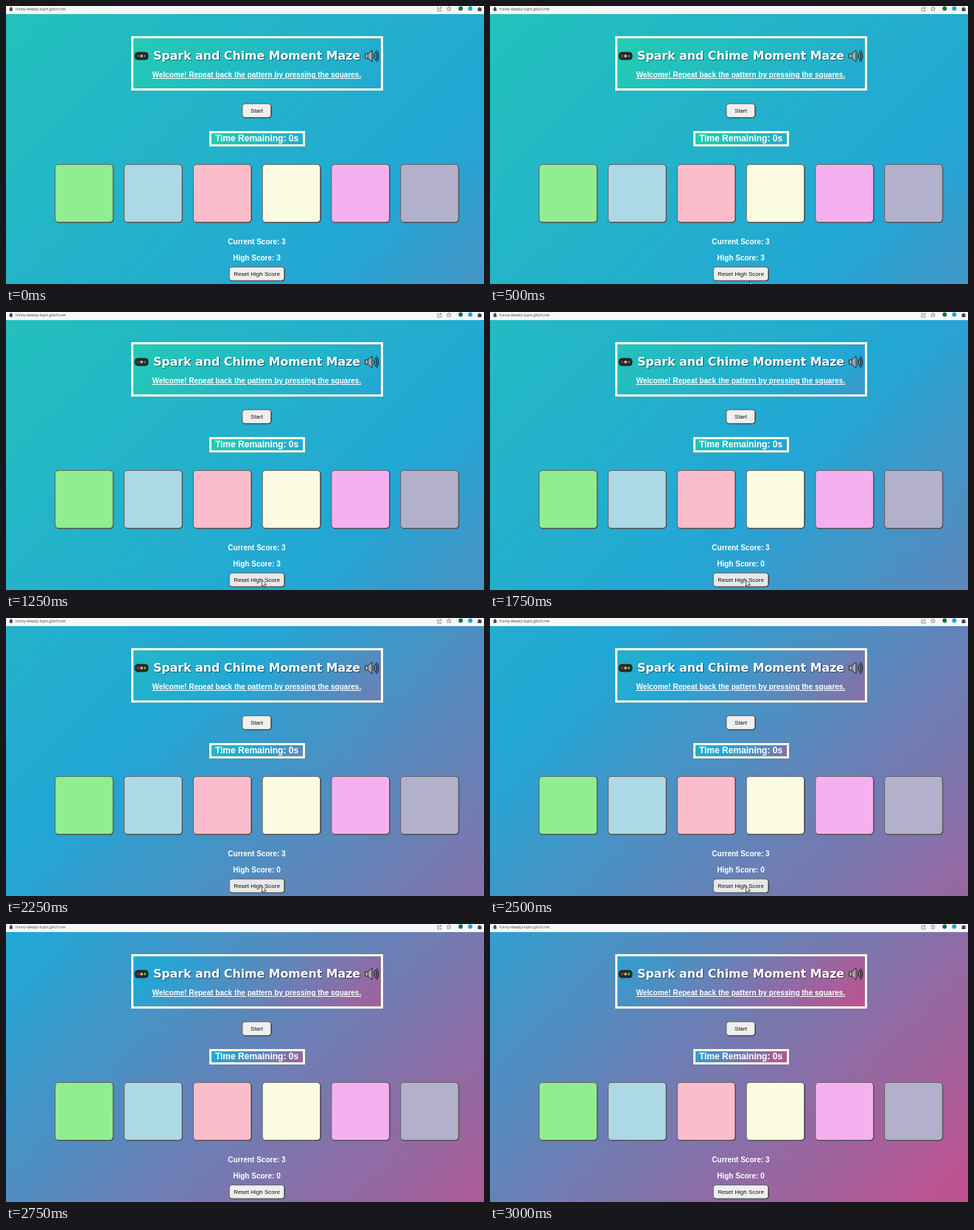
An HTML page for the animation above (3.25 s loop, 649 by 378 pixels).

```html
<!DOCTYPE html>
<html lang="en">
<head>
<meta charset="utf-8">
<title>Memory game</title>
<style>
  html, body { margin: 0; width: 100%; height: 100%; overflow: hidden; background: #f6f7f7; }
  .drift, svg { position: absolute; box-sizing: border-box; }
  .drift {
    background: linear-gradient(-45deg, #ee7752, #e73c7e, #23a6d5, #23d5ab);
    background-size: 400% 400%;
  }
  #page { left: 0; top: 11px; width: 649px; height: 367px; }
  #head { left: 169.5px; top: 41px; width: 342px; height: 74px; border: 3px solid #fdfdf0; }
  #timer { left: 275.5px; top: 170px; width: 130px; height: 20.5px; border: 3px solid #f8f8e2; }
  svg { left: 0; top: 0; }
  text { font: bold 10px "Liberation Sans", Arial, sans-serif; fill: #fff; text-anchor: middle; }
  text.title { font: bold 15.8px "DejaVu Sans", Verdana, sans-serif; text-shadow: 1px 1px 1px #0007; }
  text.label { font-weight: normal; font-size: 8px; fill: #111; }
  text.url { font: 5.1px "Open Sans", sans-serif; fill: #444; text-anchor: start; }
</style>
</head>
<body>
<div id="page" class="drift"></div>
<div id="head" class="drift"></div>
<div id="timer" class="drift"></div>
<svg width="649" height="378" viewBox="0 0 649 378">
  <!-- browser bar -->
  <path d="M5 3.2h3.6v3.2H5zM5.8 3.2V2.4a1 1 0 0 1 2 0v.8" fill="#444" stroke="#444" stroke-width=".5"/>
  <text class="url" x="13" y="5.7">funny-deeply-lupin.glitch.me</text>
  <g fill="none" stroke="#666" stroke-width=".7">
    <path d="M587.5 2H586v5h5V5M588 5q0-2.5 3-2.5M589.5 1l1.8 1.5L589.500 4"/>
    <path d="M601.500 .8l.9 2 2 .2-1.500 1.400.5 2.100-1.900-1.100-1.900 1.100.5-2.100-1.500-1.400 2-.2z"/>
  </g>
  <circle cx="617.3" cy="3.5" r="2.900" fill="#24664f"/>
  <circle cx="630.3" cy="3.5" r="3" fill="#16a9dc"/>
  <path d="M640.500 2.500h1.500a1 1 0 0 1 2 0h1.500V4a1 1 0 0 1 0 1.500V7h-5V5.500a1 1 0 0 0 0-1.500z" fill="#444"/>

  <!-- heading -->
  <rect x="175" y="63" width="18" height="10" rx="4" fill="#292b2a" stroke="#151a1a" stroke-width=".8"/>
  <g id="lamps" stroke="#111" stroke-width=".6">
    <circle cx="179.500" cy="68" r="2.200"/>
    <circle cx="184" cy="68" r="2.200"/>
    <circle cx="188.500" cy="68" r="2.200"/>
  </g>
  <g stroke="#25292b" stroke-linejoin="round" stroke-linecap="round">
    <path d="M488 65h3.500l5.500-5v16l-5.500-5H488z" fill="#a5a8a8"/>
    <path d="M491.500 65v6" stroke-width=".8"/>
    <path d="M499.500 65q2 3 0 6M501.500 62.500q4 5.500 0 11M503.300 60.500q5 7.500 0 15" fill="none" stroke-width="1.300"/>
  </g>
  <text class="title" x="340.5" y="73">Spark and Chime Moment Maze</text>
  <text x="340.3" y="97" text-decoration="underline">Welcome! Repeat back the pattern by pressing the squares.</text>
  <text x="340.5" y="184" style="font-size:12px">Time Remaining: 0s</text>

  <g id="boxes"></g>
  <text class="label" x="340.5" y="145">Start</text>
  <text x="340.5" y="324">Current Score: 3</text>
  <text id="high" x="340.5" y="345.5"></text>
  <text class="label" x="340.5" y="367">Reset High Score</text>
  <path id="cursor" d="M0 0v8.500l2-1.800 1.500 3.200 1.400-.6-1.500-3.200H6z" fill="#fff" stroke="#111" stroke-width=".7"/>
</svg>
<script>
const $ = id => document.getElementById(id);
const LOOP = 3250, STEP = 250, HALF = 7500, TURN = 950;

// Rounded box with a light top-left and dark bottom-right edge
function box(x, y, w, h, r, fill) {
  const rect = (fill, stroke, dx) =>
    `<rect x="${x + dx}" y="${y + dx}" width="${w}" height="${h}" rx="${r}" fill="${fill}" stroke="${stroke}"/>`;
  $('boxes').insertAdjacentHTML('beforeend', rect('#222', '#222', .4) + rect(fill, '#666', 0));
  return $('boxes').lastElementChild;
}
['#90ee90', '#add8e6', '#fbbccb', '#fafbe2', '#f6b0f0', '#b2b0cb'].forEach((fill, i) =>
  box(66.7 + i * 93.8, 215.4, 78.6, 78.6, 4.5, fill));
box(320.9, 132.9, 38.8, 18.6, 3.5, '#efefef');
const reset = box(303.2, 354.9, 74.600, 18.4, 3.500, '#efefef');

// The CSS "ease" curve
function ease(x) {
  const bez = (a, b, s) => 3 * a * s * (1 - s) ** 2 + 3 * b * s * s * (1 - s) + s ** 3;
  let lo = 0, hi = 1;
  for (let i = 0; i < 24; i++) {
    const mid = (lo + hi) / 2;
    if (bez(.25, .25, mid) < x) lo = mid; else hi = mid;
  }
  return bez(.1, 1, lo);
}

function draw() {
  const t = Math.floor(performance.now() % LOOP / STEP) * STEP;
  const u = (t - TURN) / HALF;
  const pos = u < 0 ? 1 - ease(1 + u) : ease(u);
  document.querySelectorAll('.drift').forEach(el => el.style.backgroundPosition = `${pos * 100}% 50%`);

  $('high').textContent = `High Score: ${t < 1500 ? 3 : 0}`;
  const colors = t < 2000 ? ['#6d4a42', '#d0c4ac', '#5c6a58'] : ['#a33a30', '#d8c65a', '#4fae55'];
  [...$('lamps').children].forEach((lamp, i) => lamp.setAttribute('fill', colors[i]));

  const shown = t >= 500 && t < 2750;
  const rest = Math.max(0, (1000 - t) / 500);
  $('cursor').setAttribute('visibility', shown ? 'visible' : 'hidden');
  $('cursor').setAttribute('transform', `translate(${347.5 + 5 * rest} ${364.500 + 10 * rest})`);
  reset.setAttribute('fill', shown && t >= 750 ? '#e8e8e8' : '#efefef');
  requestAnimationFrame(draw);
}
draw();
</script>
</body>
</html>
```
